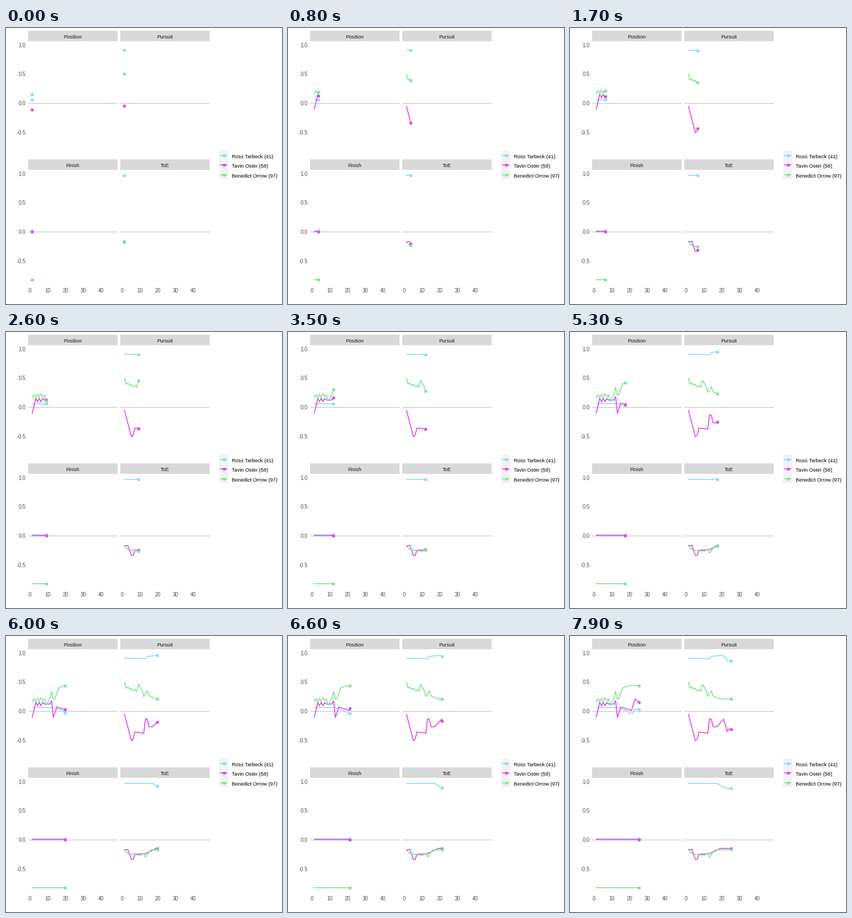
Animation of 500 by 500 pixels, one loop 8 s. Source, as a matplotlib script:

```python
import numpy as np
import matplotlib.pyplot as plt
from matplotlib.animation import FuncAnimation
from matplotlib.patches import Rectangle

plt.rcParams["font.family"] = "Liberation Sans"

SIZE, FRAMES, STEP_MS = 500, 80, 100
FULL = 150                      # frames needed to reveal every play
PLAYS = np.arange(47)
X_UNIT, Y_UNIT = 3.2016, 105.3  # pixels per play, pixels per score point
COLORS = ["#8CDDF8", "#DD4BE8", "#82E594"]
NAMES = ["Ross Tarbeck (41)", "Tavin Oster (58)", "Benedict Orrow (97)"]

fig = plt.figure(figsize=(SIZE / 72, SIZE / 72), dpi=72, facecolor="white")
ax = fig.add_axes([0, 0, 1, 1])
ax.set_xlim(0, SIZE)
ax.set_ylim(SIZE, 0)
ax.axis("off")


def path(*points, wobble=0):
    """Straight runs between (play, percent) points, zigzagging at first."""
    play, value = zip(*points)
    zigzag = wobble * (-1.0) ** PLAYS * (PLAYS < 7)
    return (np.interp(PLAYS, play, value) + zigzag) / 100


def label(x, y, text, ha="center", color="black", size=9.3):
    ax.text(x, y, text, ha=ha, va="baseline", color=color, fontsize=size)


def stroke(x, y, color, z):
    return ax.plot(x, y, color=color, lw=1.7, zorder=z,
                   solid_capstyle="butt", solid_joinstyle="round")[0]


def dot(x, y, color, z):
    return ax.plot(x, y, "o", color=color, ms=5.6, mew=0, zorder=z)[0]


def box(x, y, w, h, color):
    ax.add_patch(Rectangle((x, y), w, h, fc=color, lw=0, zorder=1))


tracks = []


def panel(title, left, top, *scores):
    zero = top + 131
    box(left, top, 162, 19, "#D9D9D9")
    box(left, zero, 162, 1, "#BEBEBE")
    label(left + 81, top + 14, title, color="#1A1A1A")
    xs = left + 7.4 + X_UNIT * PLAYS
    for k, score in enumerate(scores):
        tracks.append((xs, zero - Y_UNIT * score,
                       stroke([], [], COLORS[k], 2 + k / 10),
                       dot([], [], COLORS[k], 3 + k / 10)))


panel("Position", 40, 5,
      path((12, 6), (17, 1), (19, -4), (21, -3), (22, 4), (25, 2)),
      path((0, -14), (1, 4), (2, 12), (10, 12), (11, 18), (12, -11), (14, 7),
           (20, 1), (22, 21), (24, 15), wobble=3),
      path((0, 18), (7, 21), (8, 10), (10, 21), (11, 34), (12, 20), (13, 22),
           (15, 40), (19, 44), wobble=-3))
panel("Pursuit", 207, 5,
      path((0, 91), (12, 90), (13, 94), (19, 96), (21, 93), (22, 86)),
      path((0, -5), (4, -51), (5, -48), (6, -36), (11, -38), (12, -13),
           (13, -14), (14, -27), (16, -27), (20, -14), (22, -35), (23, -31)),
      path((0, 49), (1, 41), (7, 34), (8, 46), (10, 36), (11, 25), (13, 35),
           (14, 26), (18, 21), wobble=1.5))
panel("Finish", 40, 238, path((0, 2)), path((0, 0)), path((0, -82.5)))
panel("ToE", 207, 238,
      path((16, 97), (18, 94), (19, 91), (22, 88)),
      path((2, -17), (4, -34), (5, -34), (6, -25), (12, -24), (18, -15)),
      path((0, -18), (2, -24), (9, -27), (11, -24), (12, -30), (15, -17.5)))

for zero in (136, 369):
    for v in (1.0, 0.5, 0.0, -0.5):
        label(35.5, zero - Y_UNIT * v + 4, f"{v:.1f}", "right", "#4D4D4D", 9.5)
for left in (40, 207):
    for v in range(0, 50, 10):
        label(left + 3.6 + X_UNIT * v, 479, str(v), color="#4D4D4D", size=9.5)

box(386, 222, 17, 52, "#F2F2F2")
for y, name, color in zip((231, 248, 266), NAMES, COLORS):
    stroke([388, 401], [y, y], color, 2)
    dot([394.5], [y], color, 3)
    label(409, y + 5, name, "left")

# Each play lands on a whole frame
keys = np.round(PLAYS * (FULL - 1) / PLAYS[-1])


def update(frame):
    t = np.interp(frame, keys, PLAYS)
    n = int(t) + 1 if frame else 0
    artists = []
    for xs, ys, line, head in tracks:
        x, y = np.interp(t, PLAYS, xs), np.interp(t, PLAYS, ys)
        line.set_data(np.append(xs[:n], x), np.append(ys[:n], y))
        head.set_data([x], [y])
        artists += [line, head]
    return artists


anim = FuncAnimation(fig, update, frames=FRAMES, interval=STEP_MS,
                     repeat=True, repeat_delay=0, blit=False)
plt.show()
```
